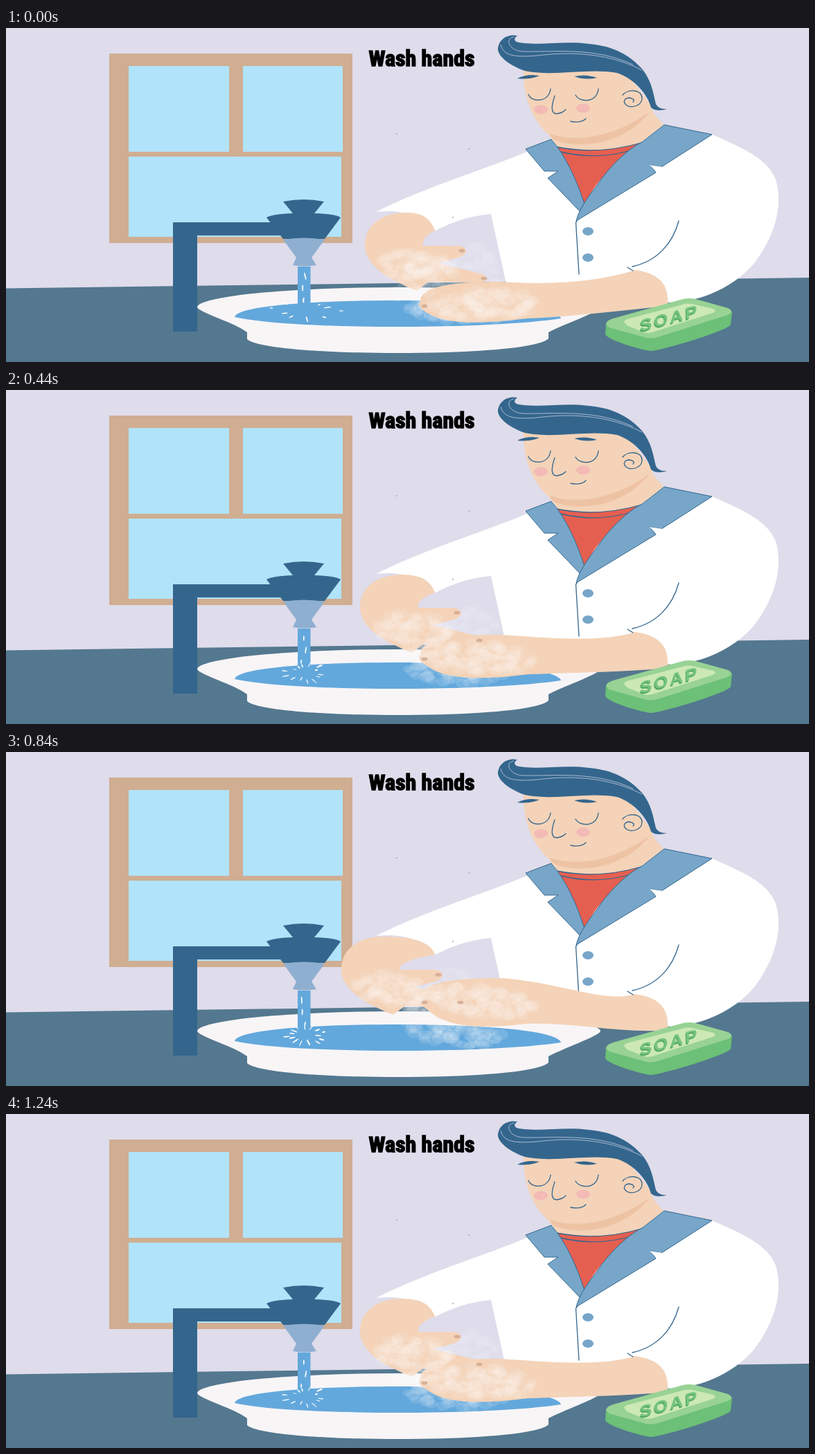
An HTML page that plays this animation: 1159 px wide and 483 px high, repeating every 1.4 s.

```html
<!DOCTYPE html>
<html lang="en">
<head>
<meta charset="utf-8">
<title>Wash hands</title>
<style>
  html, body { margin: 0; width: 100%; height: 100%; overflow: hidden; background: #dfdceb; }
  svg { display: block; width: 1159px; height: 483px; }
  .title { font: 700 32px Impact, "Roboto Condensed", "Open Sans Condensed", "Open Sans", sans-serif; font-stretch: 75%; stroke: #000; stroke-width: 1.4; }
  .soap { font: 700 27px "Liberation Sans", Arial, sans-serif; letter-spacing: 3px; }
  .navy { fill: #34668d; }
  .pane { fill: #b1e3fa; }
  .water { fill: #63a8dc; }
  .skin { fill: #f4d3b8; }
  .lapel { fill: #77a6c9; stroke: #34668d; }
  .line { fill: none; stroke: #34668d; stroke-width: 1.3; stroke-linecap: round; }
</style>
</head>
<body>
<svg viewBox="0 0 1159 483">
  <path d="M0 376.500L1159 361V483H0Z" fill="#54788f"/>

  <!-- window -->
  <path d="M149 37H500V311H149Z" fill="#cfae92"/>
  <path class="pane" d="M177 55H322V179H177ZM342 55H486V179H342ZM177 186H484V302H177Z"/>

  <!-- basin -->
  <path d="M276 404A291 29 0 0 1 858 404C855 411 806 428 783 440V449C770 463 675 470 566 470S362 463 348 450V440C330 426 280 412 276 404Z" fill="#f8f5f7"/>
  <path class="water" d="M330 418C334 402 440 394 566 394S796 403 801 420C750 428 650 432 566 432S380 429 330 418Z"/>

  <!-- tap -->
  <path class="navy" d="M241 281H400V300H276V439H241Z"/>
  <path class="navy" d="M400 251Q430 245 459 251L445 268Q476 269 483 274L460 305H400L376 274Q385 269 414 268Z"/>
  <path d="M400 306Q430 301 460 306L441 332L448 343Q431 346 414 343L419 332Z" fill="#8fafd1"/>
  <path class="water" d="M421 345H439.500V408Q430 412 421 408Z"/>

  <!-- coat -->
  <path d="M752 179C695 203 600 232 534 266C570 262 600 270 620 293Q660 272 700 269L722 370L955 397C1010 396 1055 370 1080 340C1118 290 1119 245 1111 219C1099 187 1055 170 1019 154L950 140L787 161Z" fill="#fff"/>

  <!-- head -->
  <path class="skin" d="M747 60C746 100 760 135 784 155L797 173C835 182 885 179 916 166L949 140C940 130 932 122 931 112L890 58Z"/>
  <path d="M785 153C830 168 885 153 929 121C893 169 824 178 788 160Z" fill="#eec3a3"/>
  <path class="navy" d="M738 11C722 8 710 18 710 32C714 47 735 57 749 62C790 71 840 57 882 65C908 74 926 96 931 115C938 121 947 119 954 117Q942 118 938 110C934 94 932 76 918 59C902 41 878 26 842 23C805 18 770 26 741 21C732 20 733 14 738 11Z"/>
  <path d="M733 13C719 15 726 34 748 34C790 35 850 27 905 53M714 24C718 45 748 42 785 38C835 34 882 42 918 61" fill="none" stroke="#dfdceb" stroke-width=".7"/>
  <path class="navy" d="M738 73Q752 66 770 69Q756 75 738 73ZM820 70Q837 66 853 72Q836 76 820 70Z"/>
  <path class="line" d="M754 96C758 108 784 108 786 88M822 97C828 108 853 109 855 88M792 98C787 113 786 124 795 124Q803 123 808 118M815 135Q830 138 837 131M890 97C897 88 917 88 918 101C918 113 903 116 896 112C889 107 893 101 900 101Q909 103 905 107"/>
  <g fill="#f3bab6"><ellipse cx="772" cy="118" rx="10" ry="6.500"/><ellipse cx="833" cy="116" rx="10" ry="6.500"/></g>

  <!-- shirt and lapels -->
  <path d="M795 172Q855 184 917 166C895 185 855 210 835 257Q820 207 795 172Z" fill="#e55f50"/>
  <path class="line" d="M795 172Q855 184 917 166M800 179Q855 192 905 176"/>
  <path class="lapel" d="M750 175L787 161C808 185 823 218 835 255L830 267L782 217L797 207H777Z"/>
  <path class="lapel" d="M950 140L1019 154L946 201L930 198L938 209L823 279C827 262 840 244 852 229C873 196 904 171 918 165Z"/>
  <path d="M929 198L948 201L939 208Z" fill="#fff"/>
  <path class="line" d="M824 279L822.500 281L827 356M971 279C962 312 940 337 904 345"/>
  <g fill="#77a6c9"><ellipse cx="840" cy="294" rx="8" ry="6"/><ellipse cx="840" cy="332" rx="8" ry="6"/></g>

  <g id="poses"></g>
  <path class="line" d="M897 346L905 351"/>

  <!-- soap -->
  <path d="M866 427L865 443C868 451 917 466 931 467C948 466 1041 438 1046 429L1048 410Z" fill="#6cc077"/>
  <path d="M866 428Q867 422 880 419L977 392Q986 390 995 392L1042 405Q1052 410 1042 415L941 447Q929 451 917 446L870 433Z" fill="#98d294"/>
  <path d="M892 425Q892 422 900 420L980 399Q985 398 990 399L1021 406Q1027 409 1020 412L933 440Q926 442 920 440L896 430Z" fill="#cce8b5"/>
  <g class="soap" transform="translate(915 439) rotate(-15) skewX(-14) scale(1 .85)">
    <text x="-1" y="2" fill="#4fa65f">SOAP</text>
    <text fill="#75c47d">SOAP</text>
  </g>

  <path d="M563 153h1.500M667.500 175h1.500M644 274h2" stroke="#777"/>
  <text class="title" x="600" y="55" text-anchor="middle">Wash hands</text>
</svg>
<script>
let seed = 7;
const random = (min = 0, max = 1) =>
  min + (max - min) * ((seed = seed * 16807 % 2147483647) / 2147483647);
const repeat = (count, make) => Array.from({ length: count }, (_, i) => make(i)).join('');

const oval = (x, y, rx, ry, fill, alpha = 1, angle = 0) =>
  `<ellipse rx="${rx}" ry="${ry}" fill="${fill}" opacity="${alpha}" transform="translate(${x} ${y}) rotate(${angle})"/>`;
const nail = (x, y) => oval(x, y, 4.5, 2.6, '#cfa88c', .8);
const skin = d => `<path class="skin" d="${d}"/>`;

// Translucent bubbles scattered evenly over a tilted ellipse
const foam = (x, y, rx, ry, tilt = 0, color = '#fff') =>
  repeat(Math.ceil(rx * ry / 22), i => {
    const angle = i * 2.4, reach = Math.sqrt(random());
    const dx = Math.cos(angle) * reach * rx;
    const dy = Math.sin(angle) * reach * ry + dx * tilt;
    const size = random(6, 10);
    return oval(x + dx, y + dy, size * 1.2, size * .85, color, .13);
  });

// Thin streaks flying out from the foot of the stream, and glints inside it
const splash = (spread, count) =>
  repeat(count, i => {
    const angle = (i + random(0, .5)) / count * 2 * Math.PI, reach = random(.6, 1.1);
    const dx = Math.cos(angle) * reach * spread, dy = Math.sin(angle) * reach * 14;
    const direction = Math.atan2(dy, dx) * 180 / Math.PI;
    return oval(431 + dx, 409 + dy, random(2, 5.5), random(.5, 1.1), '#fff', 1, direction);
  }) +
  repeat(3, i => oval(random(426, 434), 359 + i * 17, random(3, 6), .9, '#fff', 1, random(75, 105)));

// x is the outer edge of the bent wrist
const leftArm = x => skin(`M${x + 60} 267Q610 266 619 293Q${x + 82} 302 ${x + 84} 315
  L${x + 138} 315Q${x + 154} 322 ${x + 138} 331L${x + 105} 340L${x + 170} 356
  Q${x + 184} 366 ${x + 165} 368L${x + 92} 367L${x + 75} 380
  C${x + 40} 366 ${x - 2} 345 ${x} 312C${x + 1} 285 ${x + 25} 267 ${x + 60} 267Z`);

// y is the height of the fingertips; the elbow stays on the table
function rightArm(y) {
  const top = y - 29, bottom = 151 + .68 * y;
  return skin(`M598 ${y}C598 ${y - 22} 640 ${top} 715 ${top}C800 ${top + 6} 865 364 908 350
    C945 355 957 372 955 402C890 408 820 ${bottom - 3} 750 ${bottom}
    Q640 ${bottom + 14} 608 ${y + 16}Q592 ${y + 8} 598 ${y}Z`);
}

const pose = (wrist, reach, spread, drops) => `<g>
  ${splash(spread, drops)}
  ${foam(wrist + 156, 335, 44, 21, .1, '#f0eefb')}
  ${foam(650, 371, 75, 6)}
  ${foam(648, 408, 70, 17, .08)}
  ${leftArm(wrist)}${rightArm(reach)}
  ${foam(wrist + 75, 345, 56, 23, .08)}
  ${foam(585, 382, 26, 9)}
  ${foam(688, reach + 5, 76, 23, (390 - reach) * .004)}
  ${nail(wrist + 140, 322)}${nail(wrist + 172, 362)}${nail(604, reach + 6)}
</g>`;

const stage = document.getElementById('poses');
stage.innerHTML = pose(518, 396, 50, 10) + pose(511, 383, 27, 14) + pose(484, 356, 28, 15);
const groups = [...stage.children];
const start = performance.now();

function draw(now) {
  const time = Math.max(0, now - start) % 1400;
  const current = time < 200 ? 0 : time >= 600 && time < 1000 ? 2 : 1;
  groups.forEach((group, i) => group.style.display = i === current ? '' : 'none');
  requestAnimationFrame(draw);
}
draw(start);
</script>
</body>
</html>
```
